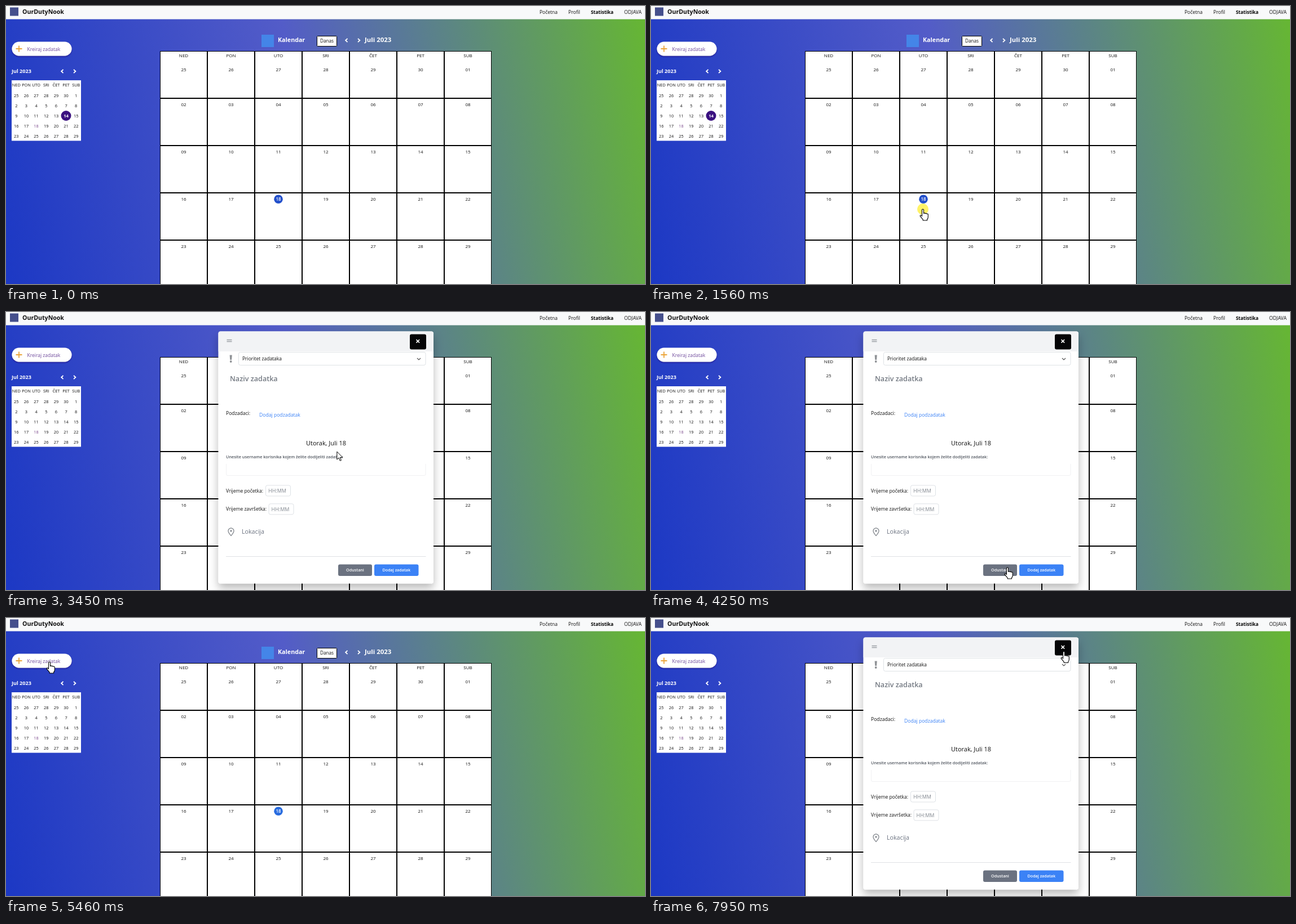
Write an HTML page that moves like this. It is 1133 px wide and 494 px high and loops after 8 s.

```html
<!DOCTYPE html>
<html lang="bs">
<head>
<meta charset="utf-8">
<title>Kalendar</title>
<style>
  html, body { margin: 0; width: 100%; height: 100%; overflow: hidden; }
  svg { display: block; width: 100%; height: 100%; }
  text { font-family: "Open Sans", "Noto Sans", sans-serif; white-space: pre; }
</style>
</head>
<body>
<svg id="stage" viewBox="0 0 1133 494" xmlns="http://www.w3.org/2000/svg"></svg>
<script>
const LOOP = 8000;
const DAYS = ["NED", "PON", "UTO", "SRI", "ČET", "PET", "SUB"];

// y is the middle of the capitals
function text(x, y, size, str, { fill = "#111", weight = 400, anchor = "start" } = {}) {
  return `<text x="${x}" y="${(y + size * 0.357).toFixed(2)}" font-size="${size}" ` +
    `font-weight="${weight}" fill="${fill}" text-anchor="${anchor}">${str}</text>`;
}
const rect = (x, y, w, h, fill, extra = "") =>
  `<rect x="${x}" y="${y}" width="${w}" height="${h}" fill="${fill}" ${extra}/>`;
const line = (d, color, width) =>
  `<path d="${d}" fill="none" stroke="${color}" stroke-width="${width}"/>`;
const chevron = (x, y, dir) =>
  line(`M${x - 2 * dir} ${y - 3.2}l${3.4 * dir} 3.2l${-3.4 * dir} 3.2`, "#fff", 1.8);

// Days shown start on 25 June
const dayNumber = i => (i < 6 ? 25 + i : i - 5);
const pad = n => String(n).padStart(2, "0");

function defs() {
  return `<defs>
    <linearGradient id="sky" gradientUnits="userSpaceOnUse" x1="-36" y1="417" x2="1169" y2="183">
      <stop offset="0" stop-color="#1a37c4"/>
      <stop offset=".48" stop-color="#535cc8"/>
      <stop offset="1" stop-color="#66b732"/>
    </linearGradient>
    <filter id="lift" x="-20%" y="-20%" width="140%" height="150%">
      <feDropShadow dx="0" dy="8" stdDeviation="8" flood-color="#000" flood-opacity=".28"/>
    </filter>
    <filter id="soft" x="-20%" y="-40%" width="140%" height="200%">
      <feDropShadow dx="0" dy="1.5" stdDeviation="1.2" flood-color="#2b1480" flood-opacity=".7"/>
    </filter>
  </defs>`;
}

function topBar() {
  return rect(0, 0, 1133, 23.5, "#f8f9fa") +
    rect(7, 2.5, 15, 15, "#454f8c") +
    text(29, 10.5, 10.6, "OurDutyNook", { weight: 700 }) +
    text(946, 10.5, 8.5, "Početna") +
    text(997, 10.5, 8.6, "Profil") +
    text(1037, 10.5, 8.4, "Statistika", { weight: 700, fill: "#000" }) +
    text(1096, 10.5, 8.7, "ODJAVA");
}

function sidebar() {
  const colX = c => 18.3 + 17.65 * c;
  const mid = { anchor: "middle" };
  let out = rect(10.5, 63.5, 106, 25, "#fff", 'rx="12.5" filter="url(#soft)"') +
    line("M17.5 76h11M23 70.5v11", "#eba63c", 1.8) +
    text(37.5, 76.5, 8.5, "Kreiraj zadatak", { fill: "#6f4a9c" }) +
    text(10, 116, 9.1, "Jul 2023", { weight: 700, fill: "#fff" }) +
    chevron(99.5, 116, -1) + chevron(122, 116, 1) +
    rect(10, 132, 123, 107.5, "#fff");
  DAYS.forEach((d, c) => { out += text(colX(c), 140, 7.3, d, mid); });
  for (let i = 0; i < 35; i++) {
    const n = dayNumber(i);
    const fill = n === 18 ? "#7c4a8c" : "#111";
    out += text(colX(i % 7), 159 + 18 * Math.floor(i / 7), 7.4, n, { ...mid, fill });
  }
  return out + `<g id="picked"><circle cx="106.5" cy="195" r="9" fill="#3a1180"/>` +
    text(106.5, 195.2, 7.6, "14", { ...mid, weight: 700, fill: "#fff" }) + "</g>";
}

function calendar() {
  const mid = { anchor: "middle" };
  let out = rect(453, 51, 22, 22, "#4485e8") +
    text(482, 60, 10.7, "Kalendar", { weight: 700, fill: "#fff" }) +
    rect(551.5, 53.5, 35, 18, "#fff", 'stroke="#000" rx="1"') +
    text(557, 62.5, 8.2, "Danas") +
    chevron(603.5, 61, -1) + chevron(626, 61, 1) +
    text(636, 60, 11.4, "Juli 2023", { weight: 700, fill: "#fff" });
  for (let i = 0; i < 35; i++) {
    const col = i % 7, row = Math.floor(i / 7);
    const x = 273 + 84 * col, y = 80 + 84 * row, cx = x + 42;
    const n = dayNumber(i), cy = row ? y + 11.3 : 113;
    const today = n === 18;
    out += rect(x + 0.5, y + 0.5, 83, 83, "#fff", 'stroke="#000"');
    if (!row) out += text(cx, 88.5, 8, DAYS[col], mid);
    if (today) out += `<circle id="today" cx="${cx}" cy="${cy}" r="7.8"/>`;
    out += text(cx, cy, 8, pad(n),
      { ...mid, fill: today ? "#fff" : "#111", weight: today ? 600 : 400 });
  }
  return out;
}

function modal() {
  const grey = "#6b7280", edge = 'stroke="#dee2e6" rx="3"';
  const timeRow = (label, y, x) =>
    text(390, y, 8.5, label) +
    rect(x + 0.5, y - 9.5, 44, 19, "#fff", edge) +
    text(x + 5, y + 0.3, 9, "HH:MM", { fill: "#80868e" });
  const button = (x, w, fill, label) =>
    rect(x, 448.5, w, 20.5, fill, 'rx="3"') +
    text(x + w / 2, 458.8, 7.2, label, { fill: "#fff", weight: 600, anchor: "middle" });
  return `<g id="modal">` +
    rect(376.5, 34.5, 381.5, 448, "#fff", 'rx="4" filter="url(#lift)"') +
    `<path d="M376.5 70V38.5a4 4 0 0 1 4-4H754a4 4 0 0 1 4 4V70z" fill="#f2f3f5"/>` +
    line("M391.5 49.5h9M391.5 52.5h9", "#9a9ea5", 1.3) +
    rect(716, 39.5, 29, 27, "#050507", 'rx="3"') +
    line("M727.5 49l5.6 5.6M733.1 49l-5.6 5.6", "#fff", 1.7) +
    `<path d="M396.6 76.5h4.2l-.7 8.5h-2.8z" fill="#8f9296"/>` +
    `<circle cx="398.7" cy="88" r="1.9" fill="#8f9296"/>` +
    rect(412.5, 71.5, 331.5, 23, "#fff", edge) +
    text(419, 83.3, 8.5, "Prioritet zadataka") +
    line("M729 82l3 3l3-3", "#555", 1.2) +
    text(397, 118, 12.6, "Naziv zadatka", { weight: 600, fill: "#737982" }) +
    text(390, 180.3, 8.6, "Podzadaci:") +
    text(449, 182.5, 8.6, "Dodaj podzadatak", { fill: "#3b82f6" }) +
    text(567.5, 233, 11, "Utorak, Juli 18", { anchor: "middle" }) +
    text(390, 257.5, 7.3, "Unesite username korisnika kojem želite dodijeliti zadatak:",
      { weight: 600, fill: "#4f555e" }) +
    line("M390.5 270v18q0 2.5 2.5 2.5H741.500q2.500 0 2.500-2.500V270", "#f0f1f3", 1) +
    timeRow("Vrijeme početka:", 317.5, 460) +
    timeRow("Vrijeme završetka:", 350.3, 465.5) +
    line("M399 397.5q-5-5.500-5-8.500a5 5 0 0 1 10 0q0 3-5 8.500z", "#8a8e94", 1.4) +
    `<circle cx="399" cy="389" r="1.7" fill="#8a8e94"/>` +
    text(418, 390.5, 10.7, "Lokacija", { fill: grey }) +
    line("M390 434.5H744.5", "#dfe1e4", 1) +
    button(589, 60, grey, "Odustani") +
    button(653, 78.500, "#3b82f6", "Dodaj zadatak") + "</g>";
}

function pointer() {
  return `<g id="pointer">
    <circle id="glow" r="10" fill="#ffee20" fill-opacity=".68"/>
    <path id="arrow" d="M0 0V14L3.200 11 5.400 16.200 7.600 15.300 5.400 10.200H10Z" fill="#fff" stroke="#000" stroke-linejoin="round"/>
    <path id="hand" d="M-1.500 12.500V1.500a1.500 1.500 0 0 1 3 0V7.500q1.600-1.200 2.900.2q1.500-.8 2.600.6q1.900-.5 2.300 1.200V14q0 2.600-1.700 4.200V20H.2v-1.600Q-2 16-4.600 12.700q-.7-2 1-2q1 .2 2.100 1.800z" fill="#fff" stroke="#000" stroke-width="1.100" stroke-linejoin="round"/>
    <path id="beam" d="M-3-7h2l1 1l1-1h2M0-6V6M-3 7h2l1-1l1 1h2" fill="none" stroke="#000" stroke-width="1.200"/>
  </g>`;
}

// Pointer route: time, x, y
const ROUTE = [
  [410, 1023, 472], [1140, 495, 364], [1290, 482, 361], [2020, 482, 361],
  [2400, 636, 260], [2560, 600, 180], [2880, 464, 139], [3150, 656, 190],
  [3450, 587, 248], [3580, 570, 264], [3650, 592, 250], [3760, 640, 234],
  [3950, 691, 300], [4320, 626, 465], [4650, 626, 465], [5310, 95, 92],
  [5460, 77, 78], [6260, 77, 78], [6540, 436, 276], [6860, 500, 240],
  [7730, 727, 76], [7950, 732, 59.5], [8000, 732, 59.5]
];

// Monotone cubic through the route, so holds stay still
function slope(i, axis) {
  if (i < 1 || i >= ROUTE.length - 1) return 0;
  const [a, b, c] = [ROUTE[i - 1], ROUTE[i], ROUTE[i + 1]];
  const before = (b[axis] - a[axis]) / (b[0] - a[0]);
  const after = (c[axis] - b[axis]) / (c[0] - b[0]);
  return before * after <= 0 ? 0 : 2 * before * after / (before + after);
}
function along(t, axis) {
  let i = 0;
  while (i < ROUTE.length - 2 && t >= ROUTE[i + 1][0]) i++;
  const a = ROUTE[i], b = ROUTE[i + 1], span = b[0] - a[0];
  const u = Math.max(0, (t - a[0]) / span), v = 1 - u;
  return a[axis] * (1 + 2 * u) * v * v + b[axis] * u * u * (3 - 2 * u) +
    span * (slope(i, axis) * u * v * v - slope(i + 1, axis) * u * u * v);
}

// Hover zones: left, top, right, bottom
const PAGE_LINKS = [[273, 80, 861, 494], [10, 63, 117, 89]];
const FORM_LINKS = [[716, 39, 745, 67], [449, 176, 522, 189], [589, 448, 649, 469], [653, 448, 731, 469]];
const FORM_INPUTS = [[390, 105, 744, 132], [390, 268, 744, 291], [460, 307, 505, 327],
  [466, 340, 510, 360], [416, 380, 744, 401]];
const hits = (zones, x, y) => zones.some(([l, t, r, b]) => x >= l && x < r && y >= t && y < b);

function pointerKind(x, y, open) {
  if (hits(open ? FORM_LINKS : PAGE_LINKS, x, y)) return "hand";
  return open && hits(FORM_INPUTS, x, y) ? "beam" : "arrow";
}

const CLICKS = [1560, 4520, 6130], CLICK_TIME = 130;
const [OPEN, CLOSE, REOPEN] = CLICKS.map(t => t + CLICK_TIME);

const stage = document.getElementById("stage");
stage.innerHTML = defs() + rect(0, 0, 1133, 494, "url(#sky)") +
  topBar() + sidebar() + calendar() + modal() + pointer();
const el = id => document.getElementById(id);
const show = (id, on) => el(id).setAttribute("display", on ? "inline" : "none");

function draw(t) {
  const open = (t >= OPEN && t < CLOSE) || t >= REOPEN;
  const x = along(t, 1), y = along(t, 2);
  const kind = pointerKind(x, y, open);
  show("modal", open);
  show("picked", t < OPEN);
  el("today").setAttribute("fill", t < OPEN ? "#224fcb" : "#276bdf");
  show("pointer", t >= ROUTE[0][0]);
  show("glow", CLICKS.some(c => t >= c && t < c + CLICK_TIME));
  for (const k of ["arrow", "hand", "beam"]) show(k, k === kind);
  el("pointer").setAttribute("transform", `translate(${x.toFixed(2)} ${y.toFixed(2)})`);
}

const start = performance.now();
function tick() {
  draw((performance.now() - start) % LOOP);
  requestAnimationFrame(tick);
}
tick();
</script>
</body>
</html>
```
